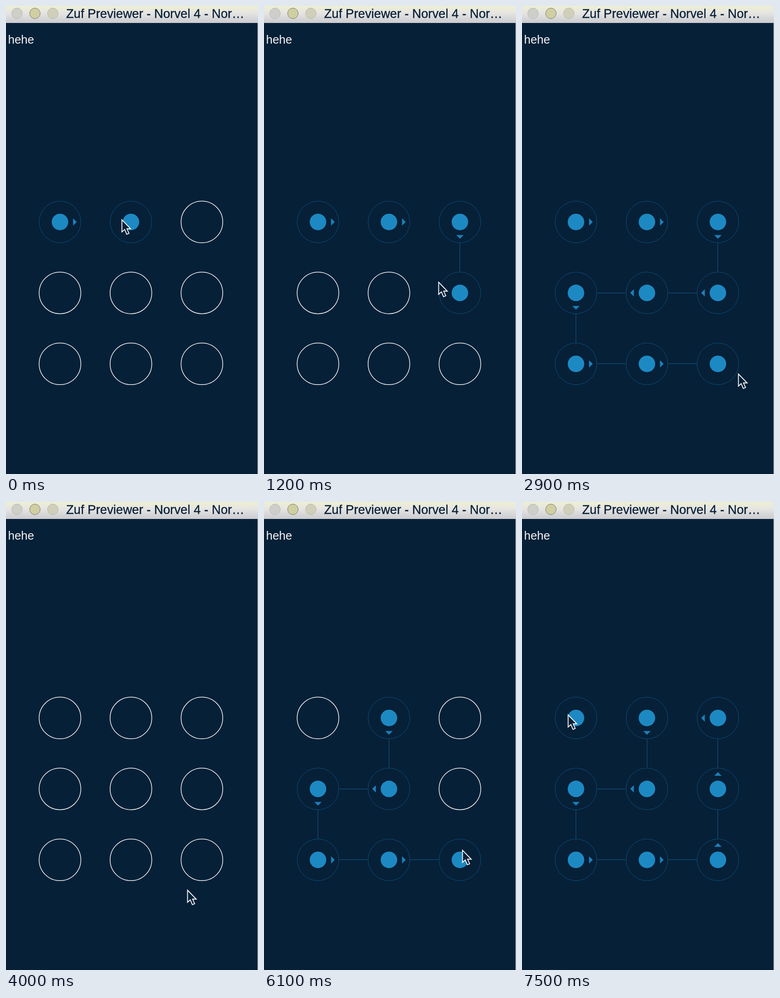
Write an HTML page that moves like this. It is 549 px wide and 1020 px high and loops after 8000 ms.

```html
<!DOCTYPE html>
<html lang="en">
<head>
<meta charset="utf-8">
<title>Pattern lock</title>
<style>
  html, body { margin: 0; width: 100%; height: 100%; overflow: hidden; background: #062038; }
  svg { display: block; width: 549px; height: 1020px; }
  text { font-family: "Liberation Sans", Arial, sans-serif; }
  .title { font-size: 27.2px; fill: #0b2038; stroke: #0b2038; stroke-width: .4; }
  .idle { fill: none; stroke: #f2f2ee; stroke-width: 1.5; }
  .ring { fill: none; stroke: #1795d6; stroke-opacity: .4; }
  .disc { fill: #1d89c3; }
  .arrow { fill: #1d80ba; }
  .link { stroke: #1b8dca; stroke-opacity: .55; shape-rendering: crispEdges; }
</style>
</head>
<body>
<svg viewBox="0 0 549 1020">
  <defs>
    <linearGradient id="bar" x2="0" y2="1">
      <stop offset="0" stop-color="#efefd2"/>
      <stop offset=".4" stop-color="#e5e5e3"/>
      <stop offset="1" stop-color="#cbcbcf"/>
    </linearGradient>
  </defs>
  <rect width="549" height="1020" fill="#062038"/>
  <rect width="549" height="37" fill="url(#bar)"/>
  <rect x="548" y="37" width="1" height="983" fill="#c9c9d6"/>
  <circle cx="24" cy="16" r="11.5" fill="#cfcfca" stroke="#b5b5b0"/>
  <circle cx="63" cy="16" r="11.5" fill="#d0cfa2" stroke="#77776a"/>
  <circle cx="102" cy="16" r="11.5" fill="#cfcfba" stroke="#b7b7a4"/>
  <text class="title" x="131" y="25.5">Zuf Previewer - Norvel 4 - Nor…</text>
  <text x="4.5" y="82" font-size="25.5" fill="#f4f4f2">hehe</text>
  <g id="grid"></g>
  <path id="cursor" d="M.5 2V28.5L6.5 23L11 33.5L16 31.5L11.5 21.5H19.5Z"
        fill="#062038" stroke="#fff" stroke-width="1.8"/>
</svg>
<script>
const LOOP = 8000, STEP = 100, RADIUS = 46;
const RELEASE = 3500, PRESS = 4600;
const grid = document.getElementById('grid');
const cursor = document.getElementById('cursor');

// Turning points of the pointer: time, x, y. Everything else follows from them.
const turns = [
  [-400, 95, 470], [0, 252, 464], [700, 425, 480], [1000, 428, 592], [1200, 380, 600],
  [1800, 108, 625], [2100, 108, 765], [2800, 471, 800], [3400, 471, 800], [3800, 395, 844],
  [4000, 395, 844], [PRESS, 255, 465], [5100, 245, 612], [5600, 105, 625], [5800, 105, 760],
  [6100, 432, 757], [6800, 440, 762], [7200, 425, 465], [7500, 100, 462], [LOOP, 100, 462],
];

const cells = Array.from({ length: 9 }, (_, i) => ({
  row: Math.floor(i / 3),
  x: 117.6 + 154.6 * (i % 3),
  y: 470.7 + 154.6 * Math.floor(i / 3),
}));

function pointerAt(t) {
  const next = turns.findIndex(turn => turn[0] >= t) || 1;
  const [t0, x0, y0] = turns[next - 1], [t1, x1, y1] = turns[next];
  const k = (t - t0) / (t1 - t0);
  return [x0 + (x1 - x0) * k, y0 + (y1 - y0) * k];
}

// The cells the pointer has touched, in order, since the button went down.
function patternAt(t) {
  if (t >= RELEASE && t < PRESS) return [];
  const touched = new Set();
  for (let s = t < RELEASE ? turns[0][0] : PRESS; s <= t; s += 10) {
    const [px, py] = pointerAt(s);
    const hit = cells.find(c => Math.hypot(px - c.x, py - c.y) < RADIUS);
    if (hit) touched.add(hit);
  }
  return [...touched];
}

function add(tag, attrs) {
  const el = document.createElementNS('http://www.w3.org/2000/svg', tag);
  for (const key in attrs) el.setAttribute(key, attrs[key]);
  grid.append(el);
}

function drawCell({ x, y }, selected) {
  add('circle', { cx: x, cy: y, r: RADIUS - .6, class: selected ? 'ring' : 'idle' });
  if (selected) add('circle', { cx: x, cy: y, r: 18, class: 'disc' });
}

function drawStep(from, to) {
  const dx = to.x - from.x, dy = to.y - from.y;
  const angle = Math.atan2(dy, dx) * 180 / Math.PI;
  const transform = `translate(${from.x} ${from.y}) rotate(${angle})`;
  add('path', { d: 'M28.5 -8L36.5 0L28.5 8Z', transform, class: 'arrow' });
  // Links along the top row are not visible.
  if (from.row || to.row) {
    add('line', { x1: RADIUS, x2: Math.hypot(dx, dy) - RADIUS, transform, class: 'link' });
  }
}

function render(t) {
  const pattern = patternAt(t);
  grid.replaceChildren();
  cells.forEach(cell => drawCell(cell, pattern.includes(cell)));
  pattern.slice(1).forEach((cell, i) => drawStep(pattern[i], cell));
  cursor.setAttribute('transform', `translate(${pointerAt(t)})`);
}

const begin = performance.now();
let shown = -1;
function tick() {
  const elapsed = (performance.now() - begin) % LOOP;
  const t = Math.floor(elapsed / STEP) * STEP;
  if (t !== shown) render(shown = t);
  requestAnimationFrame(tick);
}
tick();
</script>
</body>
</html>
```
